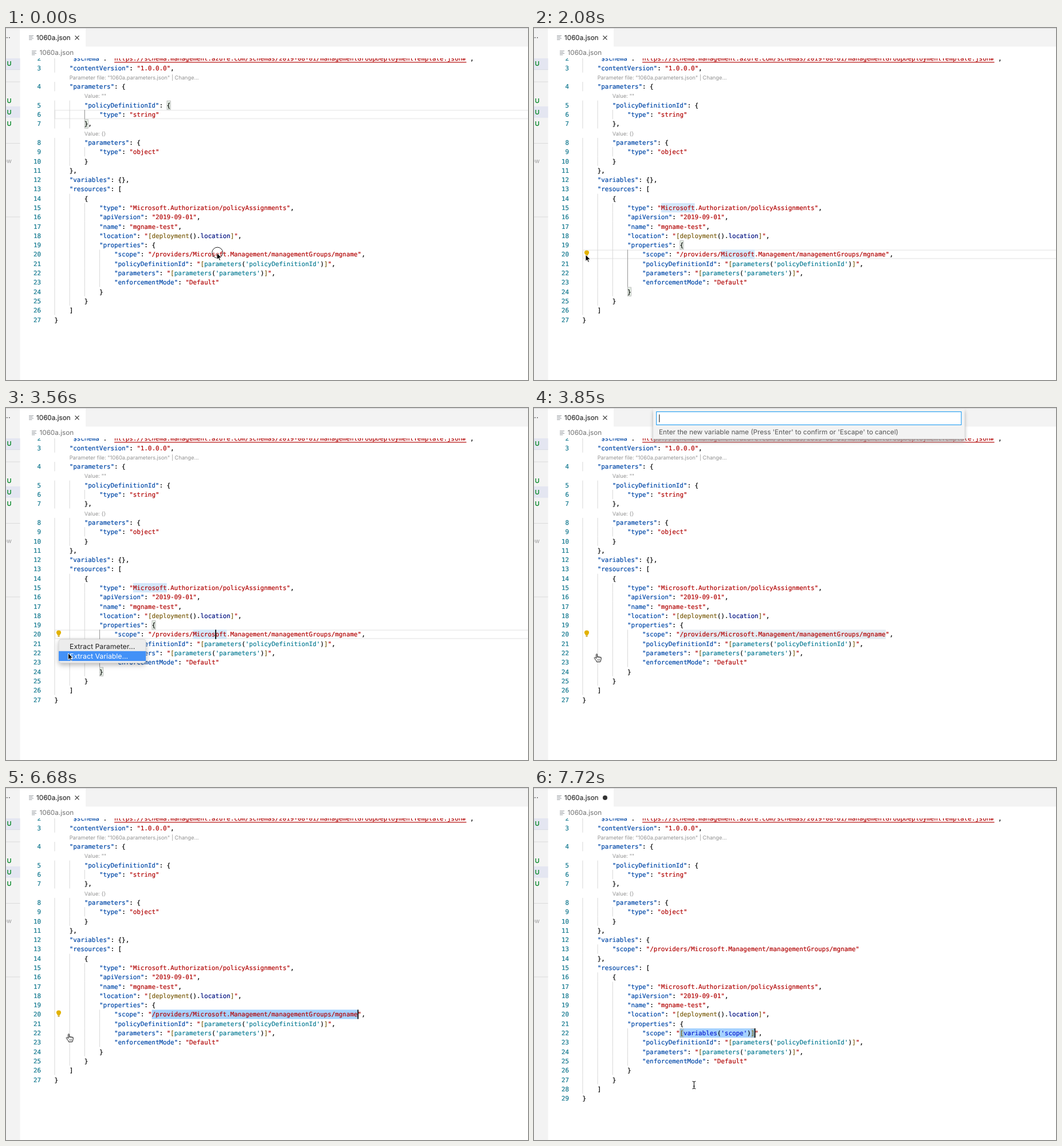
An HTML page that plays this animation: 911x615 px, repeating every 8000 ms.

```html
<!DOCTYPE html>
<html lang="en">
<head>
<meta charset="utf-8">
<title>Extract variable</title>
<style>
html, body { margin: 0; width: 100%; height: 100%; overflow: hidden; background: #fff; }
svg { display: block; width: 911px; height: 615px; }
text { white-space: pre; text-rendering: geometricPrecision; font: 11.7px Inter, "Open Sans", sans-serif; }
.code text { font: 10.857px "DejaVu Sans Mono", "Liberation Mono", monospace; stroke-width: .22px; }
.code .lens { font: 9.3px Inter, "Open Sans", sans-serif; }
.num { fill: #12788f; stroke: #12788f; text-anchor: end; }
.title { stroke: #333; stroke-width: .2px; }
.menu text { font-size: 12.3px; }
.side { font-size: 11px; font-weight: 600; }
</style>
</head>
<body>
<svg id="stage" viewBox="0 0 911 615" xmlns="http://www.w3.org/2000/svg"></svg>
<script>
const LOOP = 8000, STEP = 148.5;
const CHAR = 6.536, ROW = 16.29, LEFT = 84.5, FIRST = 53.4;
const colX = c => LEFT + c * CHAR;
const rowY = r => FIRST + r * ROW;
const INK = { key: '#0048a8', str: '#b30808', fn: '#7c5f12', ref: '#0c7d95', variable: '#0a20d0', prop: '#001080', plain: '#000' };

const PATH = '/providers/Microsoft.Management/managementGroups/mgname';
const head = [
  '    "$schema": "https://schema.management.azure.com/schemas/2019-08-01/managementGroupDeploymentTemplate.json#",',
  '    "contentVersion": "1.0.0.0",',
  '~    Parameter file: "1060a.parameters.json" | Change...',
  '    "parameters": {',
  '~        Value: ""',
  '        "policyDefinitionId": {',
  '            "type": "string"',
  '        },',
  '~        Value: {}',
  '        "parameters": {',
  '            "type": "object"',
  '        }',
  '    },'
];
const tail = scope => [
  '    "resources": [',
  '        {',
  '            "type": "Microsoft.Authorization/policyAssignments",',
  '            "apiVersion": "2019-09-01",',
  '            "name": "mgname-test",',
  '            "location": "[deployment().location]",',
  '            "properties": {',
  `                "scope": "${scope}",`,
  '                "policyDefinitionId": "[parameters(\'policyDefinitionId\')]",',
  '                "parameters": "[parameters(\'parameters\')]",',
  '                "enforcementMode": "Default"',
  '            }',
  '        }',
  '    ]',
  '}'
];
const before = [...head, '    "variables": {},', ...tail(PATH)];
const after = [...head, '    "variables": {', `        "scope": "${PATH}"`, '    },', ...tail("[variables('scope')]")];

const rect = (x, y, w, h, fill, more = '') =>
  `<rect x="${x}" y="${y}" width="${w}" height="${h}" fill="${fill}" ${more}/>`;
const label = (x, y, s, fill, more = '') => `<text x="${x}" y="${y}" fill="${fill}" ${more}>${s}</text>`;
const group = (id, body, more = '') => `<g id="${id}" ${more}>${body}</g>`;
const band = (row, col, len, fill) => rect(colX(col), rowY(row) - ROW / 2, len * CHAR, ROW, fill);
const bracket = (row, col) =>
  rect(colX(col) + .4, rowY(row) - 7.6, CHAR - .4, ROW - 1, 'rgba(0,100,0,.1)', 'stroke="#b9b9b9" stroke-width=".9"');
const lineFrame = row => rect(85.4, rowY(row) - 7.4, 840, ROW - 1.6, 'none', 'stroke="#eee" stroke-width="1.8"');
const activeGuide = (row, col, rows) => rect(colX(col), rowY(row) - ROW / 2, .95, rows * ROW, '#939393');

function exprInk(s) {
  if (s === '"') return INK.str;
  if (/[[\]]|^deployment$/.test(s)) return INK.fn;
  if (s === 'location') return INK.prop;
  if (/^(variables|'scope')$/.test(s)) return INK.variable;
  return /\w/.test(s) ? INK.ref : INK.plain;
}

function tokens(line) {
  const out = [];
  for (const m of line.matchAll(/"[^"]*"(?=:)|"[^"]*"|[^"]+/g)) {
    const s = m[0], isKey = line[m.index + s.length] === ':';
    if (s.startsWith('"['))
      for (const p of s.matchAll(/'[^']*'|\w+|./g)) out.push([m.index + p.index, p[0], exprInk(p[0])]);
    else
      out.push([m.index, s, s[0] !== '"' ? INK.plain : isKey ? INK.key : INK.str]);
  }
  return out;
}

function listing(lines) {
  let n = 2, html = '';
  lines.forEach((line, r) => {
    const y = rowY(r) + 4;
    if (line[0] === '~') {
      const s = line.slice(1), col = s.search(/\S/);
      html += label(colX(col), y - .1, s.trim(), '#949494', 'class="lens"');
      return;
    }
    const indent = line.search(/\S/);
    for (let c = 0; c < indent; c += 4) html += rect(colX(c), rowY(r) - ROW / 2, .9, ROW, '#d3d3d3');
    html += `<text class="num" x="61" y="${y}">${n++}</text><text y="${y}">`;
    for (const [c, s, ink] of tokens(line)) {
      const pad = s.search(/\S/);
      if (pad >= 0) html += `<tspan x="${colX(c + pad)}" fill="${ink}" stroke="${ink}">${s.trim()}</tspan>`;
    }
    html += '</text>';
  });
  return html;
}

function fileIcon(x, y) {
  return [9, 7, 9, 6].map((w, i) => rect(x, y + i * 2.3, w * .9, .9, '#8f9499')).join('');
}

const sidebar =
  rect(0, 0, 24.5, 615, '#f3f3f3') +
  rect(0, 53, 24.5, 19.5, '#e4e6f1') + rect(0, 72.3, 24.5, .9, '#d3d6e2') +
  rect(0, 137, 24.5, 19.8, '#e4e6f1') +
  [93.6, 201, 329.6].map(y => rect(0, y, 24.5, .9, '#d8d8d8')).join('') +
  [1, 5].map(x => rect(x, 16, 1.6, 1.6, '#555')).join('') +
  [66.4, 131, 151, 171].map(y => label(1.6, y, 'U', '#0a8a2a', 'class="side"')).join('') +
  label(10, 235.5, 'ow', '#a0a0a0', 'text-anchor="end" style="font-size:11px"');

const header =
  rect(24.5, 0, 887, 53, '#fff') + rect(139, 0, 772, 32.5, '#f3f3f3') +
  fileIcon(40, 13) + label(53, 21, '1060a.json', '#333', 'class="title"') +
  fileIcon(45, 39.5) + label(58.5, 47.3, '1060a.json', '#707070') +
  group('close', '<path d="M120.5 13.5l7 7m0-7l-7 7" stroke="#424242" stroke-width="1.1"/>') +
  group('dirty', '<circle cx="124" cy="17" r="4" fill="#333"/>');

const bulb = '<path d="M92 388.4a4.1 4.1 0 0 0-4.1 4.1c0 1.9 1.7 2.6 2 4.4h4.2c.3-1.8 2-2.5 2-4.4a4.1 4.1 0 0 0-4.1-4.1z" fill="#e2b200"/>' +
  rect(90.3, 397.4, 3.4, 2.2, '#c39a10', 'rx=".8"');

const menu =
  rect(92, 404, 152, 41.4, '#ececec', 'rx="4.5" stroke="#c4c4c4" stroke-width=".6" filter="url(#soft)"') +
  rect(92, 0, 152, 17.2, '#4391f7', 'id="pick"') +
  label(111, 420.5, 'Extract Parameter...', '#222', 'id="item0"') +
  label(111, 437.8, 'Extract Variable...', '#222', 'id="item1"');

const prompt =
  rect(208, 1, 543.5, 53, '#f3f3f3', 'filter="url(#drop)"') +
  rect(213.7, 6.6, 532, 22.8, '#fff', 'stroke="#0090f1" stroke-width=".95"') +
  label(218.3, 22.2, '', '#444', 'id="typed"') +
  rect(218, 11.3, 1, 13.6, '#000', 'id="typeCaret"') +
  label(218, 46.2, "Enter the new variable name (Press 'Enter' to confirm or 'Escape' to cancel)", '#555');

const BEAM = 'M-3 -6.5Q-.2 -6.5 0 -5Q.2 -6.5 3 -6.5M0 -5V5M-3 6.5Q-.2 6.5 0 5Q.2 6.5 3 6.5M-1.6 2H1.6';
const cursors =
  group('ring', '<circle r="9.4" fill="none" stroke="#222" stroke-width="1"/>') +
  group('arrow', '<path d="M0 0V11.6L2.7 9.1L4.5 13.3L6.4 12.5L4.6 8.4H8.2Z" fill="#000" stroke="#fff" stroke-width=".9"/>') +
  group('beam', `<path d="${BEAM}" fill="none" stroke="#fff" stroke-width="2.4"/><path d="${BEAM}" fill="none" stroke="#111" stroke-width="1.1"/>`) +
  group('hand', '<path d="M.2 8.6L-.9 7.4C-1.6 6.6 -2 6.6 -2.5 6.8C-3.6 7.3 -3 8.2 -2.4 9L.4 12.6L1 14.6H7.4L8.4 11.6Q9.2 9.4 9 7.2C8.9 5.9 7.2 6 7 7C7 5.4 5 5.2 4.7 6.4C4.6 5 2.7 4.8 2.3 6V1.7C2.2 .3 .3 .3 .2 1.7Z" fill="#fff" stroke="#111" stroke-width="1" stroke-linejoin="round"/><path d="M2.3 6V8M4.7 6.4V8.2M7 7V8.5M2.6 10V12.4M4.5 10V12.4M6.3 10V12.4" stroke="#111" stroke-width=".7"/>');

const WORD = '#d3e8fb';
const editor =
  group('atType', lineFrame(6) + bracket(5, 30) + bracket(7, 8)) +
  group('atScope', lineFrame(21) + bracket(20, 26) + bracket(25, 12)) +
  group('words', band(16, 21, 9, WORD) + band(21, 37, 9, WORD)) +
  group('dimSel', band(21, 26, 55, '#e5ebf1')) +
  group('fullSel', band(21, 26, 55, '#a6d2ff')) +
  group('newSel', band(23, 26, 20, '#a6d2ff') + bracket(23, 26) + bracket(23, 45)) +
  group('docA', listing(before)) + group('docB', listing(after)) +
  rect(colX(16), 59.2, 94 * CHAR, 1.2, INK.str) +
  group('guideType', activeGuide(6, 8, 1)) + group('guideScope', activeGuide(21, 12, 4)) +
  group('bulb', bulb) +
  rect(0, 0, 1.8, ROW, '#000', 'id="caret"');

document.getElementById('stage').innerHTML =
  `<defs>
    <clipPath id="pane"><rect x="24.5" y="53" width="887" height="562"/></clipPath>
    <filter id="drop" x="-10%" y="-30%" width="120%" height="180%"><feDropShadow dx="0" dy="4.5" stdDeviation="3.4" flood-color="#a8a8a8"/></filter>
    <filter id="soft" x="-15%" y="-40%" width="130%" height="200%"><feDropShadow dx="0" dy="3.5" stdDeviation="4" flood-color="#000" flood-opacity=".28"/></filter>
  </defs>` +
  rect(0, 0, 911, 615, '#fff') + `<g class="code" clip-path="url(#pane)">${editor}</g>` +
  sidebar + header + rect(0, 0, 911, .9, '#cfcfcf') +
  group('menu', menu, 'class="menu"') + group('prompt', prompt) + cursors;

const $ = id => document.getElementById(id);
const show = (id, on) => $(id).setAttribute('visibility', on ? 'inherit' : 'hidden');
const set = (id, attrs) => { for (const k in attrs) $(id).setAttribute(k, attrs[k]); };
const ease = p => p * p * (3 - 2 * p);
// Pointer moves advance in seven held steps.
const glide = (t, start) => ease(Math.min(7, Math.max(0, Math.floor((t - start + 2) / STEP) + 1)) / 7);
const mix = (a, b, p) => a + (b - a) * p;

function pointer(t) {
  if (t < 300) return ['arrow', 368, 393];
  if (t < 2230) {
    const p = glide(t, 1190);
    if (p === 1) return ['arrow', 90, 396];
    return ['beam', mix(366.7, 90, p), mix(392.7, 396, p) - 6 * Math.sin(Math.PI * p)];
  }
  if (t < 3700) {
    const p = glide(t, 2370);
    return ['arrow', mix(90, 108.5, p), mix(396, 428.3, p)];
  }
  if (t < 7570) return ['hand', 108.3, 429];
  return t < 7720 ? ['beam', 214, 487] : ['beam', 279.3, 519];
}

function caretOn(t) {
  if (t < 150) return false;
  if (t < 3850) return t < 390 || Math.floor((t - 390) / 500) % 2 === 0;
  if (t < 6680) return false;
  return t < 7270 || t >= 7720;
}

function draw(t) {
  const within = (a, b) => t >= a && t < b;
  const done = t >= 6830, asking = within(3850, 6680), atScope = within(150, 3850);

  show('docA', !done); show('docB', done);
  show('close', !done); show('dirty', done);
  show('atType', t < 150); show('guideType', t < 150);
  show('atScope', atScope); show('guideScope', atScope);
  show('words', within(440, 3850));
  show('dimSel', asking);
  show('fullSel', within(6680, 6830));
  show('newSel', done);
  show('bulb', within(590, 6830));

  const [row, col] = done ? [23, 46] : t >= 6680 ? [21, 81] : [21, 43];
  set('caret', { x: colX(col) - .5, y: rowY(row) - ROW / 2 });
  show('caret', caretOn(t));

  const [kind, x, y] = pointer(t);
  for (const id of ['arrow', 'beam', 'hand']) show(id, id === kind);
  set(kind, { transform: `translate(${x} ${y})` });
  show('ring', t < 300 || within(2230, 2370) || within(3410, 3560));
  set('ring', { transform: `translate(${x + 1} ${y - .5})` });

  const open = within(2230, 3700);
  const item = x < 92 || y < 407.5 ? -1 : y < 424.6 ? 0 : 1;
  show('menu', open);
  show('pick', open && item >= 0);
  set('pick', { y: item ? 424.8 : 407.5 });
  [0, 1].forEach(i => set('item' + i, { fill: i === item ? '#fff' : '#222' }));

  show('prompt', asking);
  const count = t < 4590 ? 0 : t < 4890 ? 1 : t < 5640 ? 3 : t < 5780 ? 4 : 5;
  $('typed').textContent = 'scope'.slice(0, count);
  set('typeCaret', { x: 218.3 + (count ? $('typed').getComputedTextLength() : 0) });
}

const begin = performance.now();
function tick() {
  draw((performance.now() - begin) % LOOP);
  requestAnimationFrame(tick);
}
tick();
</script>
</body>
</html>
```
